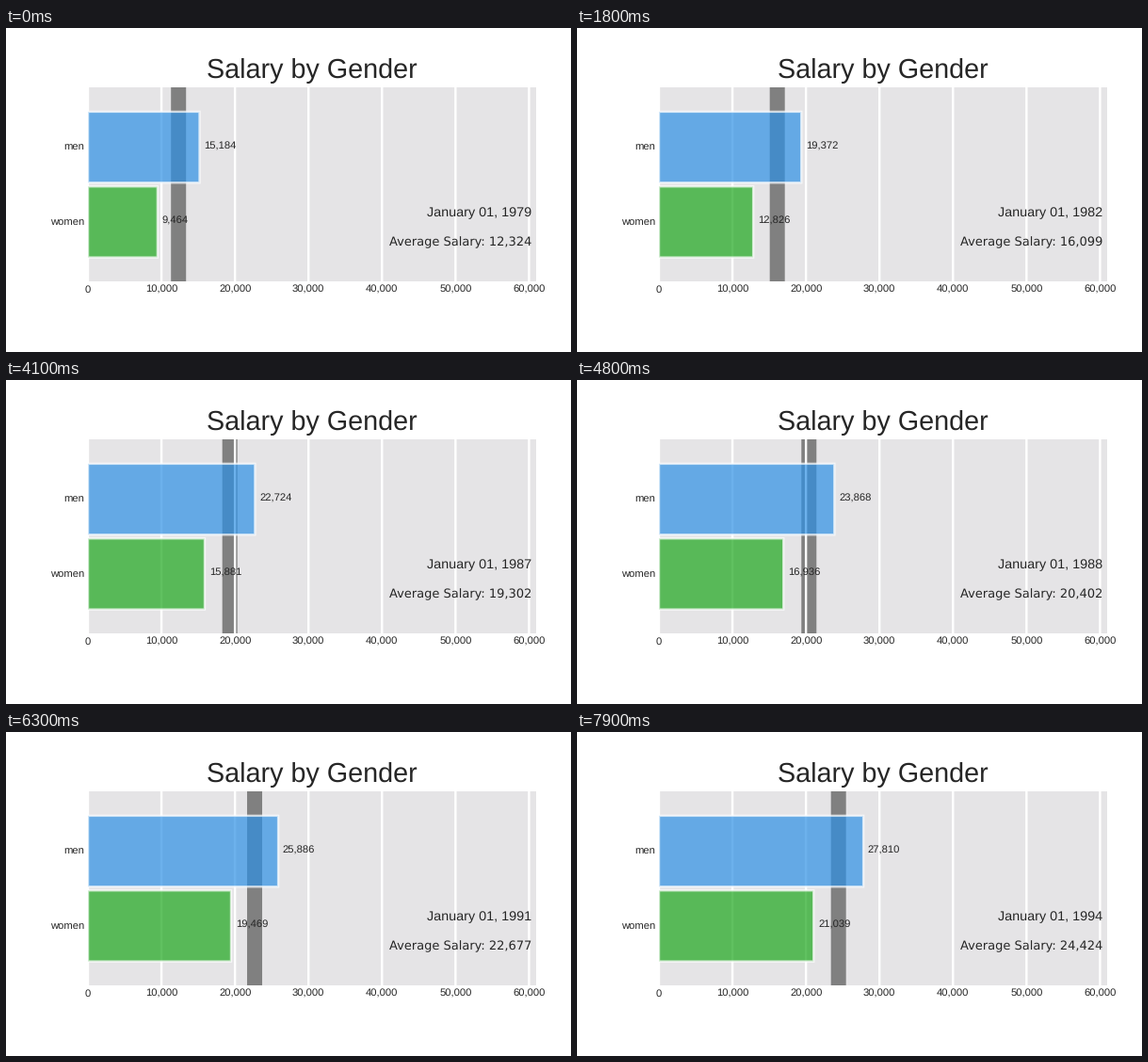
Animation of 600 by 344 pixels, one loop 8 s. Source, as a matplotlib script:

```python
import numpy as np
import matplotlib.pyplot as plt
from matplotlib.animation import FuncAnimation

W, H = 600, 344
FRAMES, STEPS, START = 80, 5, 1979
PT = 1.6 * 0.72          # chart points to 100 dpi points
INK = "#262626"

# key points: years since the start, weekly pay of men and of women
KEYS = [(0, 292, 182), (1.8, 334.6, 215.4), (3, 364, 239), (5.6, 401, 272.2),
        (8.2, 437, 305.4), (11, 481, 346), (12.6, 497.8, 374.4), (15.8, 534.8, 404.6)]
YEARS, MEN, WOMEN = np.transpose(KEYS)
WEEKS = 52

LEFT, RIGHT, TOP, BOTTOM = 87, 563, 63.1, 269.4
UNIT = 78.07 / 10000     # pixels per currency unit
TICKS = range(0, 60001, 10000)

plt.rcParams["font.family"] = "Liberation Sans"
plt.rcParams["text.hinting"] = "none"
fig = plt.figure(figsize=(W / 100, H / 100), dpi=100, facecolor="white")
ax = fig.add_axes([LEFT / W, 1 - BOTTOM / H, (RIGHT - LEFT) / W, (BOTTOM - TOP) / H],
                  facecolor="#e5e4e6")
ax.set_xlim(0, (RIGHT - LEFT) / UNIT)
ax.set_ylim(0.2, 2.8)
ax.set_axisbelow(True)
ax.set_xticks(TICKS)
ax.set_yticks([])
ax.grid(axis="x", color="white", lw=1.5 * PT, ls="-")
ax.tick_params(length=0, labelbottom=False)
for line in ax.get_xgridlines():
    line.set_snap(False)
for spine in ax.spines.values():
    spine.set_visible(False)


def label(x, y, text, size, ha="left", **kw):
    """Text with its baseline at pixel (x, y), y counted from the top."""
    return fig.text(x / W, 1 - y / H, text, fontsize=size * PT, ha=ha,
                    va="baseline", color=INK, **kw)


label((LEFT + RIGHT) / 2, 53, "Salary by Gender", 18, "center")
for v in TICKS:
    label(LEFT + v * UNIT, 281, f"{v:,}", 7, "center")
label(83.2, 130, "men", 7, "right")
label(83.2, 210, "women", 7, "right")

band = ax.axvline(0, color="0.5", lw=10 * PT, zorder=0.5, snap=False)
bars = ax.barh([2, 1], [1, 1], height=0.95, color=["#2e91e5", "#1ca71c"],
               alpha=0.7, ec="white", lw=1.5 * PT, snap=False)
values = [label(0, 129, "", 7), label(0, 208, "", 7)]
date = label(558.5, 200, "", 9, "right")
average = label(558.5, 231, "", 8.15, "right", family="DejaVu Sans")


def update(i):
    t = i / STEPS
    pay = [WEEKS * np.interp(t, YEARS, weekly) for weekly in (MEN, WOMEN)]
    for bar, text, v in zip(bars, values, pay):
        bar.set_width(v)
        text.set_x((LEFT + v * UNIT + 4.76) / W)
        text.set_text(f"{v:,.0f}")
    mean = sum(pay) / 2
    band.set_xdata([mean, mean])
    date.set_text(f"January 01, {START + i // STEPS}")
    average.set_text(f"Average Salary: {mean:,.0f}")
    return [band, *bars, *values, date, average]


anim = FuncAnimation(fig, update, frames=FRAMES, interval=100,
                     repeat=True, repeat_delay=0, blit=False)
plt.show()
```
